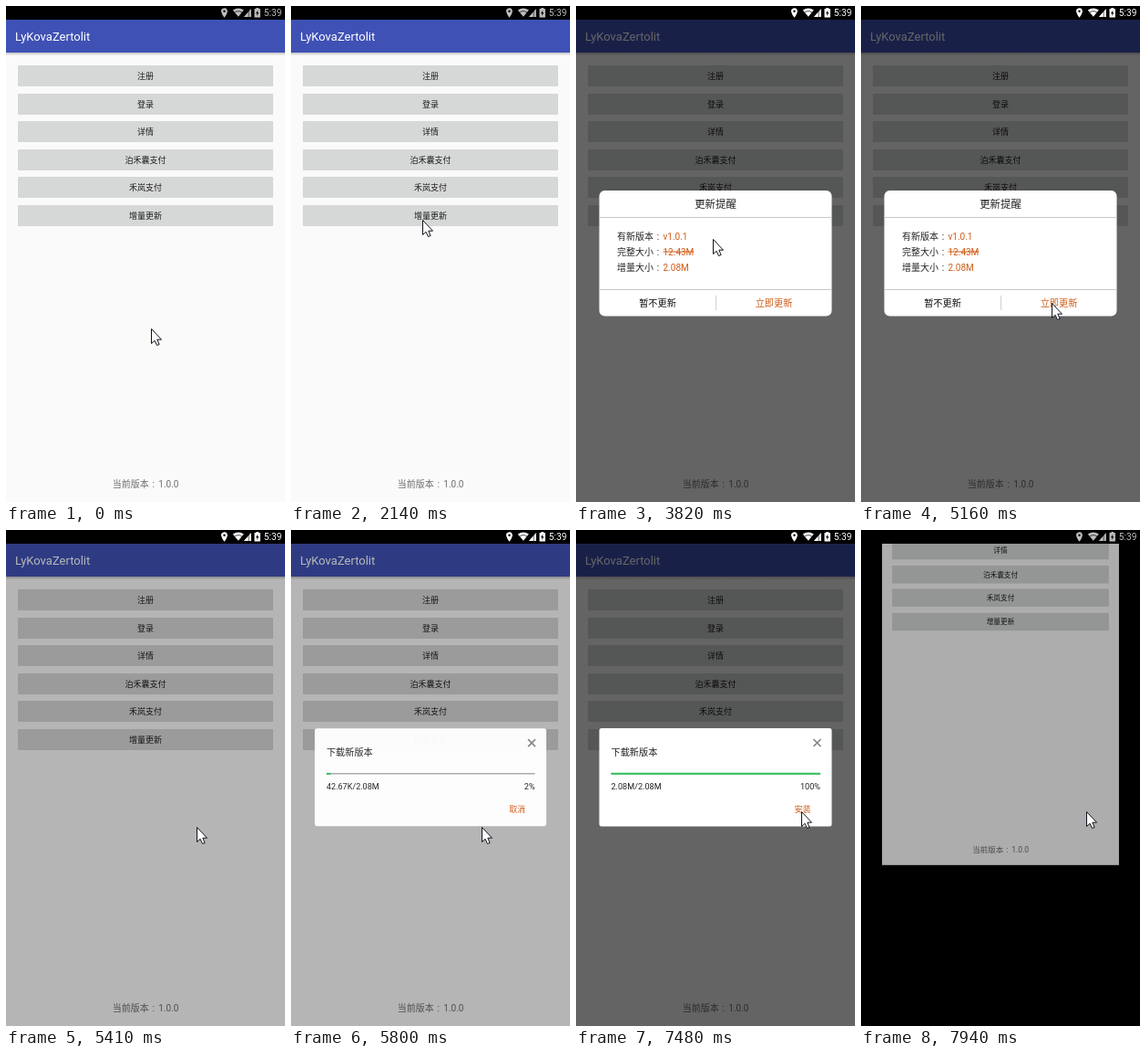
Write an HTML page with a canvas that moves like this. It is 306x543 px and loops after 8 s.

```html
<!DOCTYPE html>
<html lang="zh-CN">
<head>
<meta charset="utf-8">
<title>Update dialog</title>
<style>
html, body { margin: 0; width: 100%; height: 100%; overflow: hidden; background: #000; }
canvas { display: block; width: 306px; height: 543px; }
</style>
</head>
<body>
<canvas id="stage"></canvas>
<script>
const W = 306, H = 543, MID = 153, LOOP = 8000, BAR = 15, STEP = 150;
const ORANGE = '#cf5a14', INK = '#222';
const FONT = 'Roboto, "Noto Sans CJK SC", "Noto Sans CJK", sans-serif';
const BUTTONS = ['注册', '登录', '详情', '泊禾囊支付', '禾岚支付', '增量更新'];
const ASK = { open: 2740, close: 5410 };
const LOAD = { open: 5800, close: 7790 };
const TOTAL_K = 2133.5;

// Pointer strokes: start time, number of steps, end point
const MOVES = [
  { start: 1090, steps: 8, x: 144, y: 234 },
  { start: 2290, steps: 1, x: 143, y: 228 },
  { start: 3820, steps: 4, x: 175, y: 359 },
  { start: 4420, steps: 2, x: 209, y: 325 },
  { start: 6530, steps: 7, x: 247, y: 308 }
];

const canvas = document.getElementById('stage');
const ctx = canvas.getContext('2d');
const dpr = window.devicePixelRatio || 1;
canvas.width = W * dpr;
canvas.height = H * dpr;

const clamp = v => Math.max(0, Math.min(1, v));
const lerp = (a, b, p) => a + (b - a) * p;
const ease = p => (p + p * p * (3 - 2 * p)) / 2;
// Progress that advances once per screen refresh
const stepped = (t, start, steps) => clamp((Math.floor((t - start) / STEP) + 1) / steps);

function pointerAt(t) {
  let x = 159, y = 353;
  for (const m of MOVES) {
    const p = ease(stepped(t, m.start, m.steps));
    x = lerp(x, m.x, p);
    y = lerp(y, m.y, p);
  }
  return [Math.round(x), Math.round(y)];
}

// 0 = closed, 1 = fully open
function openness(t, { open, close }) {
  if (t < close) return stepped(t, open, 3);
  return clamp((1 - Math.floor((t - close) / 120)) / 3);
}

function rect(x, y, w, h, color, r = 0) {
  ctx.fillStyle = color;
  ctx.beginPath();
  ctx.roundRect(x, y, w, h, r);
  ctx.fill();
}

// y is the visual middle of the line
function text(str, x, y, size, color, align = 'left') {
  ctx.font = `${size}px ${FONT}`;
  ctx.textAlign = align;
  ctx.fillStyle = color;
  ctx.fillText(str, x, y + size * .37);
}

// Four-character label, centred colon in a full-width cell, then the value
function pair(label, value, x, y, color, valueColor = color) {
  text(label, x, y, 10, color);
  text(':', x + 45, y, 10, color, 'center');
  text(value, x + 50.5, y, 10, valueColor);
}

function poly(points, fill) {
  ctx.beginPath();
  points.forEach(([x, y]) => ctx.lineTo(x, y));
  ctx.closePath();
  ctx.fillStyle = fill;
  ctx.fill();
}

function drawStatus(color) {
  rect(0, 0, W, BAR, '#000');
  // location pin
  ctx.fillStyle = color;
  ctx.beginPath();
  ctx.arc(239.5, 5.7, 3.4, Math.PI * .9, Math.PI * .1);
  ctx.quadraticCurveTo(242, 9.6, 239.5, 12.8);
  ctx.quadraticCurveTo(237, 9.6, 236.2, 6.7);
  ctx.fill();
  rect(238.3, 4.5, 2.4, 2.4, '#000', 1.2);
  // wifi
  ctx.fillStyle = color;
  ctx.beginPath();
  ctx.moveTo(254.8, 11.8);
  ctx.lineTo(248.8, 4.6);
  ctx.quadraticCurveTo(254.8, .4, 260.8, 4.6);
  ctx.fill();
  ctx.strokeStyle = '#000';
  ctx.lineWidth = .7;
  ctx.beginPath();
  ctx.arc(254.8, 11.8, 6.2, Math.PI * 1.2, Math.PI * 1.8);
  ctx.stroke();
  // signal
  poly([[260.8, 12], [268.8, 12], [268.8, 3]], color);
  rect(265.8, 3, .6, 9, '#000');
  // battery
  rect(272.5, 3, 6.4, 9.6, color, .6);
  rect(274.4, 2, 2.6, 1.2, color);
  poly([[276.4, 4.6], [273.9, 8.2], [275.5, 8.2], [275, 11], [277.5, 7.3], [275.9, 7.3]], '#000');
  text('5:39', 302.5, 7.4, 10.2, color, 'right');
}

function drawPage() {
  rect(0, BAR, W, H - BAR, '#fafafa');
  rect(0, BAR, W, 36, '#3f51b5');
  const shade = ctx.createLinearGradient(0, 51, 0, 54.5);
  shade.addColorStop(0, 'rgba(0,0,0,.22)');
  shade.addColorStop(1, 'rgba(0,0,0,0)');
  rect(0, 51, W, 3.5, shade);
  text('LyKovaZertolit', 10, 33.2, 13, '#fff');
  BUTTONS.forEach((label, i) => {
    const y = Math.round(65 + i * 30.6);
    rect(13, y, 280, 23, '#d6d7d7', 1);
    text(label, MID, y + 11.6, 9, '#1c1c1c', 'center');
  });
  pair('当前版本', '1.0.0', 116.8, 523.5, '#6c6c6c');
}

function drawAsk() {
  rect(25.5, 202, 255, 137.5, '#fff', 6);
  text('更新提醒', MID, 217, 11.4, INK, 'center');
  rect(25.5, 231, 255, 1, '#c8c8c8');
  pair('有新版本', 'v1.0.1', 45, 252, INK, ORANGE);
  pair('完整大小', '12.43M', 45, 269, INK, ORANGE);
  rect(95.5, 268.6, 33.8, .8, ORANGE);
  pair('增量大小', '2.08M', 45, 286, INK, ORANGE);
  rect(25.5, 310, 255, 1, '#c8c8c8');
  rect(153, 317, 1, 16, '#d0d0d0');
  text('暂不更新', 89.5, 325, 10.2, '#111', 'center');
  text('立即更新', 217, 325, 10.2, ORANGE, 'center');
}

const fileSize = k => k < 1000 ? k.toFixed(2) + 'K' : (k / 1024).toFixed(2) + 'M';

function drawLoad(level) {
  const done = lerp(.02, 1, (level * 3 - 1) / 2);
  rect(25.5, 217, 255, 107.5, '#fff', 2.5);
  text('下载新版本', 38.5, 243.5, 10.2, INK);
  ctx.strokeStyle = '#858585';
  ctx.lineWidth = 1.7;
  ctx.beginPath();
  for (const d of [-4, 4]) {
    ctx.moveTo(264.5 - d, 229);
    ctx.lineTo(264.5 + d, 237);
  }
  ctx.stroke();
  rect(38.5, 266, 229.5, 1.6, '#a9a9a9');
  rect(38.5, 265.8, 229.5 * done, 2, '#2fc15b');
  text(`${fileSize(TOTAL_K * done)}/${fileSize(TOTAL_K)}`, 38.5, 280.8, 9.1, INK);
  text(Math.round(done * 100) + '%', 268, 280.8, 9.1, INK, 'right');
  text(done < 1 ? '取消' : '安装', 248.5, 305.5, 9, ORANGE, 'center');
}

function drawDialog(level, paint) {
  const zoom = lerp(.994, 1, level);
  ctx.save();
  ctx.globalAlpha = lerp(.955, 1, level);
  ctx.translate(MID * (1 - zoom), 271 * (1 - zoom));
  ctx.scale(zoom, zoom);
  paint(level);
  ctx.restore();
}

function drawPointer(x, y) {
  ctx.save();
  ctx.translate(x + .5, y + .5);
  poly([[0, 0], [0, 16], [3.6, 12.8], [6, 18], [8.6, 17], [6.3, 11.7], [11, 11.7]], '#fff');
  ctx.strokeStyle = '#10101c';
  ctx.lineWidth = 1;
  ctx.stroke();
  ctx.restore();
}

function draw(t) {
  const ask = openness(t, ASK), load = openness(t, LOAD);
  const leaving = t >= LOAD.close;
  const leave = leaving ? Math.floor((t - LOAD.close) / STEP) : 0;
  const scale = lerp(1, .849, leave);
  const dim = leaving ? .31 : .6 * Math.max(ask, load) ** .7;

  ctx.setTransform(dpr, 0, 0, dpr, 0, 0);
  rect(0, 0, W, H, '#000');
  ctx.save();
  ctx.translate(MID * (1 - scale), -94.3 * leave);
  ctx.scale(scale, scale);
  drawPage();
  rect(0, BAR, W, H - BAR, `rgba(0,0,0,${dim})`);
  ctx.restore();

  if (ask && t < ASK.close) drawDialog(ask, drawAsk);
  if (load && !leaving) drawDialog(load, drawLoad);
  drawStatus(t >= ASK.open && !leaving ? '#fff' : '#bdbdbd');
  drawPointer(...pointerAt(t));
}

const start = performance.now();
function tick() {
  draw((performance.now() - start) % LOOP);
  requestAnimationFrame(tick);
}
tick();
</script>
</body>
</html>
```
